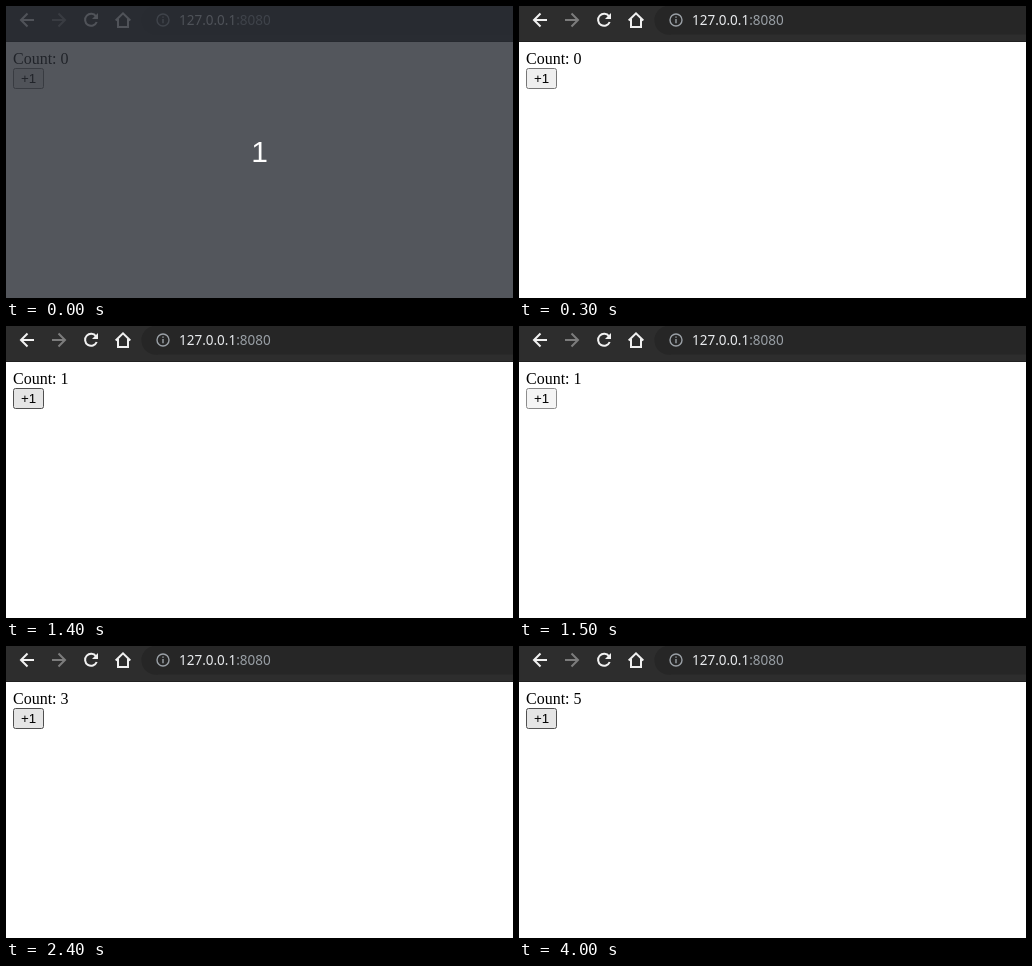
Write an HTML page that moves like this. It is 507 px wide and 292 px high and loops after 4500 ms.

```html
<!DOCTYPE html>
<html lang="en">
<head>
<meta charset="utf-8">
<title>Counter</title>
<style>
  html, body { margin: 0; width: 100%; height: 100%; overflow: hidden; background: #fff; }
  #stage { position: relative; width: 507px; height: 292px; overflow: hidden; background: #fff; }
  #bar { position: absolute; left: 0; top: 0; }
  #url {
    position: absolute; left: 173px; top: 4px;
    font: 13.5px/20px "Noto Sans", sans-serif; color: #9aa0a6; white-space: pre;
  }
  #url b { font-weight: 400; color: #e8eaed; }
  #label {
    position: absolute; left: 7px; top: 44px;
    font: 16px/18px "Liberation Serif", serif; color: #000; white-space: pre;
  }
  #button {
    position: absolute; left: 7px; top: 62px; width: 31px; height: 21px;
    box-sizing: border-box; border: 1px solid; border-radius: 2.5px;
    font: 13.333px/19px "Liberation Sans", sans-serif; text-align: center; color: #000;
  }
  .idle { background: #efefef; border-color: #767676 !important; }
  .hover { background: #e5e5e5; border-color: #4f4f4f !important; }
  .active { background: #f5f5f5; border-color: #8d8d8d !important; }
  #countdown {
    position: absolute; inset: 0; background: rgba(40, 44, 52, .8);
    font: 30px/292px "Liberation Sans", sans-serif; text-align: center; color: #fff;
    animation: countdown 4500ms step-end infinite;
  }
  @keyframes countdown { 0% { visibility: visible; } 2.2222% { visibility: hidden; } 100% { visibility: hidden; } }
</style>
</head>
<body>
<div id="stage">
  <svg id="bar" width="507" height="36" viewBox="0 0 507 36" fill="none" stroke="#f1f1f1" stroke-width="2">
    <path d="M0 0H507V36H0Z" fill="#2d2d2d" stroke="none"/>
    <path d="M507 0H147A14.5 14.5 0 0 0 153 28.5H507Z" fill="#262626" stroke="none"/>
    <path d="M0 35.5H507" stroke="#202020" stroke-width="1"/>
    <path d="M28 14H15.5M21.5 7.5L15 14L21.5 20.5"/>
    <path d="M46 14H58.5M52.5 7.5L59 14L52.5 20.5" stroke="#7c7c7c"/>
    <path d="M90 10.3A6 6 0 1 0 90.7 16"/>
    <path d="M92 7V13H86Z" fill="#f1f1f1" stroke="none"/>
    <path d="M109.7 14.5L117 7.3L124.3 14.5M112 13V21H122V13"/>
    <g stroke="#9aa0a6" stroke-width="1.4">
      <circle cx="157" cy="14" r="6"/>
      <path d="M157 13V17.3M157 10.4V11.8"/>
    </g>
  </svg>
  <div id="url"><b>127.0.0.1</b>:8080</div>
  <div id="label">Count: <span id="count">0</span></div>
  <div id="button" class="idle">+1</div>
  <div id="countdown">1</div>
</div>
<script>
  const LOOP = 4500;
  // start time, count, button state
  const timeline = [
    [0, 0, "idle"], [300, 0, "hover"],
    [700, 0, "active"], [800, 1, "hover"],
    [1400, 1, "active"], [1500, 2, "hover"],
    [2000, 2, "active"], [2100, 2, "hover"], [2200, 3, "hover"],
    [2400, 3, "active"], [2500, 4, "hover"],
    [2600, 4, "active"], [2700, 5, "hover"],
    [4000, 5, "idle"]
  ];
  const count = document.getElementById("count");
  const button = document.getElementById("button");
  const overlay = document.getElementById("countdown").getAnimations()[0];

  function draw() {
    // share the overlay's clock so both stay in step
    const time = (overlay.currentTime || 0) % LOOP;
    const [, value, state] = timeline.findLast(([start]) => start <= time);
    count.textContent = value;
    button.className = state;
    requestAnimationFrame(draw);
  }
  draw();
</script>
</body>
</html>
```
